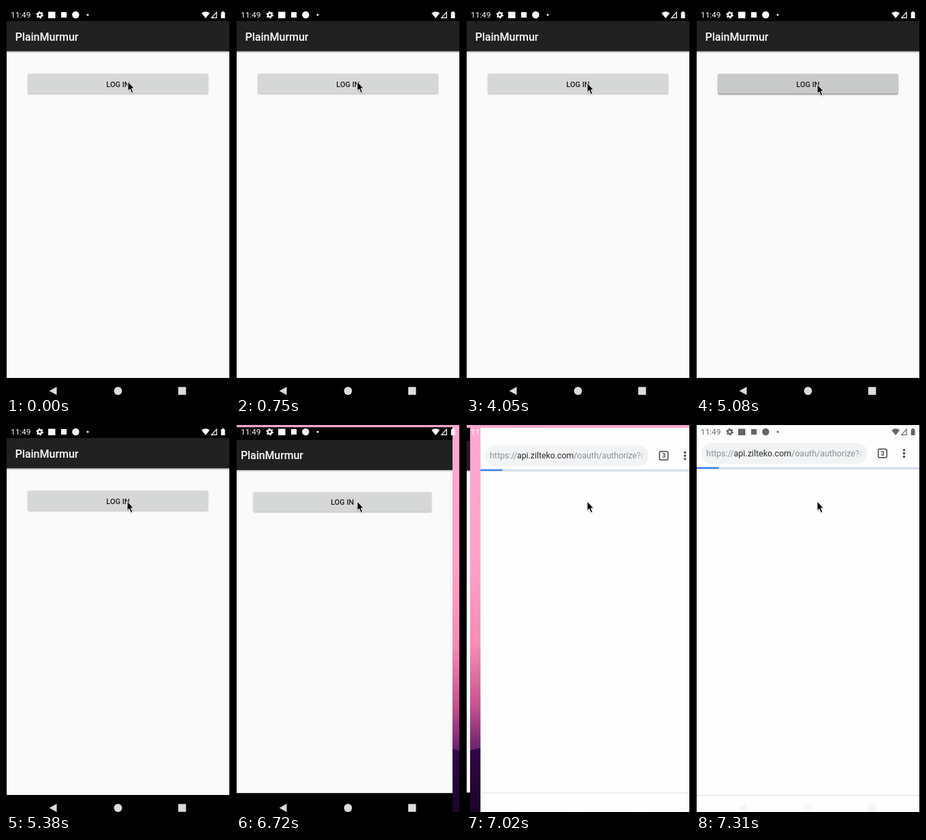
An HTML page that plays this animation: 329x571 px, repeating every 8000 ms.

```html
<!DOCTYPE html>
<html lang="en">
<head>
<meta charset="utf-8">
<title>Log in</title>
<style>
  html, body { margin: 0; width: 100%; height: 100%; overflow: hidden; background: #000; }
  svg { display: block; width: 329px; height: 571px; font-family: Roboto, "Open Sans", sans-serif; }
  .medium { font-weight: 500; }
</style>
</head>
<body>
<svg viewBox="0 0 329 571">
  <defs>
    <linearGradient id="sky" x1="0" y1="0" x2="0" y2="481" gradientUnits="userSpaceOnUse">
      <stop offset="0" stop-color="#ffa8d2"/>
      <stop offset=".45" stop-color="#ffa0c6"/>
      <stop offset=".68" stop-color="#f78bb4"/>
      <stop offset=".86" stop-color="#c8548f"/>
      <stop offset="1" stop-color="#6a1f70"/>
    </linearGradient>
    <linearGradient id="hill" x1="0" y1="0" x2="0" y2="1">
      <stop offset="0" stop-color="#350750"/>
      <stop offset="1" stop-color="#1b0429"/>
    </linearGradient>
    <linearGradient id="drop" x1="0" y1="0" x2="0" y2="1">
      <stop offset="0" stop-opacity=".3"/>
      <stop offset="1" stop-opacity="0"/>
    </linearGradient>
    <linearGradient id="fade">
      <stop offset="0" stop-color="#f1f3f4" stop-opacity="0"/>
      <stop offset="1" stop-color="#f1f3f4"/>
    </linearGradient>
    <filter id="soft" x="-20%" y="-40%" width="140%" height="180%"><feGaussianBlur stdDeviation=".9"/></filter>
    <clipPath id="display"><rect x="1" y="3" width="327" height="568"/></clipPath>
    <clipPath id="address"><rect x="12" y="30" width="232.5" height="30"/></clipPath>
  </defs>

  <rect width="329" height="571"/>
  <g clip-path="url(#display)">
    <rect width="329" height="571" fill="url(#sky)"/>
    <path d="M0 482L53 469.5L68 466L150 474L318 478.5L329 481V571H0Z" fill="url(#hill)"/>

    <g id="app">
      <rect x="1" y="3" width="327" height="580"/>
      <rect x="1" y="66" width="327" height="480" fill="#fafafa"/>
      <rect x="1" y="22" width="327" height="44.5" fill="#212121"/>
      <rect x="1" y="66.5" width="327" height="3" fill="url(#drop)"/>
      <text class="medium" x="13.5" y="50.5" font-size="16" fill="#fff">PlainMurmur</text>
      <rect id="shade" x="32.5" width="264" height="29" rx="1" filter="url(#soft)"/>
      <rect id="button" x="32.5" y="99.5" width="264" height="29" rx="1"/>
      <text class="medium" x="164.5" y="118.5" font-size="11" text-anchor="middle" fill="#1c1c1c">LOG IN</text>
    </g>

    <g id="page">
      <rect x="1" y="3" width="327" height="580" fill="#fefefe"/>
      <rect x="7.5" y="29" width="244" height="31" rx="15.5" fill="#f1f3f4"/>
      <text x="15" y="49" font-size="12.5" fill="#8b8e91" clip-path="url(#address)">https://<tspan fill="#2a2b2d">api.zilteko.com</tspan>/oauth/authorize?client</text>
      <rect x="236" y="32" width="10" height="26" fill="url(#fade)"/>
      <rect x="267.7" y="38.2" width="12.6" height="12.6" rx="2" fill="none" stroke="#444" stroke-width="1.5"/>
      <text x="274" y="47.8" font-size="9" font-weight="700" text-anchor="middle" fill="#444">3</text>
      <g fill="#444">
        <circle cx="305.6" cy="39.6" r="1.7"/><circle cx="305.6" cy="44.5" r="1.7"/><circle cx="305.6" cy="49.4" r="1.7"/>
      </g>
      <rect x="1" y="65" width="327" height="2" fill="#cbdcf3"/>
      <rect x="1" y="67" width="327" height="2.5" fill="url(#drop)" opacity=".4"/>
      <rect x="1" y="65" width="32.5" height="2" fill="#1a73e8"/>
      <rect x="1" y="546" width="327" height="1" fill="#dedede"/>
    </g>

    <g id="nav">
      <path d="M63.5 565L74.5 559V571Z"/>
      <circle cx="164.5" cy="565" r="5.9"/>
      <rect x="253" y="559.3" width="11.4" height="11.4" rx=".8"/>
    </g>

    <g id="status">
      <text x="7" y="17" font-size="11.8">11:49</text>
      <circle cx="49.6" cy="13" r="2.9" fill="none" stroke="currentColor" stroke-width="2.2"/>
      <circle cx="49.6" cy="13" r="4.5" fill="none" stroke="currentColor" stroke-width="1.7" stroke-dasharray="2.2 2.512"/>
      <rect x="62" y="8.5" width="10.5" height="9.5"/>
      <rect x="81" y="9" width="8" height="8"/>
      <circle cx="102.3" cy="13" r="5.2"/>
      <circle cx="120" cy="13" r="1.5"/>
      <path d="M287.2 10.5Q293.2 6 299.2 10.5L293.2 18Z"/>
      <path d="M301.8 17.3H309.3V9.3Z" fill="none" stroke="currentColor" stroke-width="1.2"/>
      <path d="M315.8 9.2H317.4V8H320V9.2H321.6V18H315.8Z"/>
    </g>
  </g>

  <g id="cursor">
    <path d="M1 1V14.6L4 11.9L6.4 17.5L8.9 16.4L6.5 11H10.4Z" opacity=".35" transform="translate(.2 1)" filter="url(#soft)"/>
    <path d="M1 1V14.6L4 11.9L6.4 17.5L8.9 16.4L6.5 11H10.4Z" stroke="#fff" stroke-width="1" stroke-linejoin="round"/>
  </g>
</svg>
<script>
  const LOOP = 8000;
  const PAGE_GAP = 342.5;   // distance between the two sliding screens
  const el = Object.fromEntries([...document.querySelectorAll("g[id], rect[id]")].map(n => [n.id, n]));

  // Each step holds until the next one.
  const cursorSteps = [
    { at: 0, x: 178, y: 110 },
    { at: 750, x: 177, y: 110 },
    { at: 900, x: 177, y: 111 },
    { at: 4050, x: 177, y: 112 },
    { at: 4190, x: 177, y: 113 },
    { at: 4340, x: 177, y: 114 }
  ];
  const slideSteps = [
    { at: 0, scale: 1, shift: 0, status: "#fff", nav: "#dcdcdc" },
    { at: 6720, scale: .989, shift: -8.2, status: "#fff", nav: "#dcdcdc" },
    { at: 6870, scale: .954, shift: -267, status: "#fff", nav: "#fff" },
    { at: 7020, scale: .986, shift: -319.7, status: "#fff", nav: "#fff" },
    { at: 7160, scale: .9966, shift: -337.3, status: "#aaa", nav: "#f8f8f8" },
    { at: 7310, scale: 1, shift: -PAGE_GAP, status: "#666", nav: "#f5f5f5" }
  ];

  const stepAt = (steps, t) => steps.findLast(step => step.at <= t);

  function set(node, attrs) {
    for (const name in attrs) node.setAttribute(name, attrs[name]);
  }

  function place(node, scale, shift) {
    const x = (1 - scale) * 164.5 + shift;
    const y = (1 - scale) * 293;
    set(node, { transform: `translate(${x} ${y}) scale(${scale})` });
  }

  function draw(t) {
    const pointer = stepAt(cursorSteps, t);
    const { scale, shift, status, nav } = stepAt(slideSteps, t);
    const pressed = t >= 5080 && t < 5380;

    set(el.cursor, { transform: `translate(${pointer.x} ${pointer.y})` });
    place(el.app, scale, shift);
    place(el.page, scale, shift + PAGE_GAP * scale);
    set(el.button, { fill: pressed ? "#c8c9c9" : "#d6d7d7" });
    set(el.shade, { y: pressed ? 101 : 100.2, opacity: pressed ? .45 : .3 });
    set(el.status, { fill: status, color: status });
    set(el.nav, { fill: nav });
  }

  const start = performance.now();
  function tick() {
    draw((performance.now() - start) % LOOP);
    requestAnimationFrame(tick);
  }
  tick();
</script>
</body>
</html>
```
